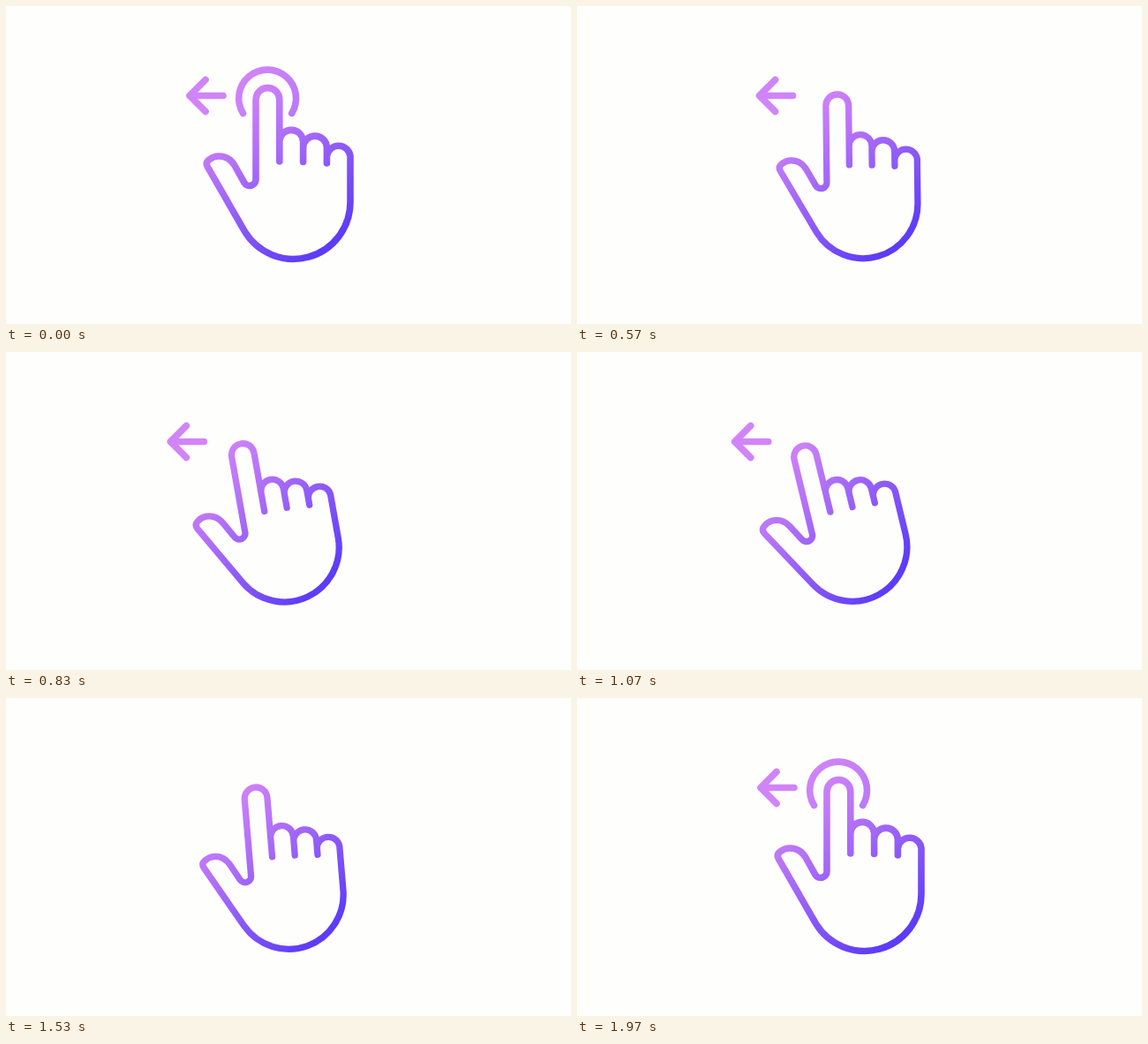
Recreate the animation shown at these times as an HTML page. Size 640 by 360 pixels, loop 2010 ms.

```html
<!DOCTYPE html>
<html lang="en">
<head>
<meta charset="utf-8">
<title>Swipe left gesture</title>
<style>
  html, body { margin: 0; width: 100%; height: 100%; overflow: hidden; background: #fefefd; }
  svg { display: block; width: 100%; height: 100%; }
  g { fill: none; stroke-width: 7.6; stroke-linecap: round; stroke-linejoin: round; }
</style>
</head>
<body>
<svg viewBox="0 0 640 360">
  <defs>
    <linearGradient id="skin" gradientUnits="userSpaceOnUse" x1="245" y1="110" x2="365" y2="270">
      <stop offset="0" stop-color="#d384f8"/>
      <stop offset=".3" stop-color="#b572f8"/>
      <stop offset="1" stop-color="#5c3cf8"/>
    </linearGradient>
    <linearGradient id="glow" gradientUnits="userSpaceOnUse" x1="270" y1="72" x2="326" y2="126">
      <stop offset="0" stop-color="#d384f8"/>
      <stop offset="1" stop-color="#b97af8"/>
    </linearGradient>
  </defs>
  <g id="arrow" stroke="#d184f7"><path/></g>
  <g id="ring" stroke="url(#glow)"><path/></g>
  <g id="hand" stroke="url(#skin)"><path/></g>
</svg>
<script>
  const LOOP = 2010, FPS = 30, FRAMES = 60;
  const TURN = -13.6, SHIFT = -29.3, SHRINK = .04;
  const PIVOT = { x: 303, y: 275.5 };
  const [arrow, ring, hand] = ["arrow", "ring", "hand"].map(id => document.getElementById(id));

  const setPath = (group, d) => group.firstElementChild.setAttribute("d", d);

  // Point on a circle, angle in degrees clockwise from the right.
  function onCircle(x, y, r, deg) {
    const a = deg * Math.PI / 180;
    return `${x + r * Math.cos(a)} ${y + r * Math.sin(a)}`;
  }

  function arrowPath(x, y, head, length) {
    return `M${x + length} ${y}H${x}M${x + head} ${y - head}L${x} ${y}L${x + head} ${y + head}`;
  }

  function ringPath(x, y, r, droop) {
    return `M${onCircle(x, y, r, 180 - droop)}A${r} ${r} 0 1 1 ${onCircle(x, y, r, droop)}`;
  }

  function handPath() {
    const palm = 64.4, cup = 7, tip = 13.4, lean = 149.5;
    const left = 283, right = left + 2 * tip, side = 390;
    // Palm and thumb up to the index finger; both thumb edges share one lean.
    let d = `M${side} 170V222A${palm} ${palm} 0 0 1 ${onCircle(side - palm, 222, palm, lean)}`
      + "L228.6 182.7Q225.5 177.5 230 174Q235 170 241 170Q253 170 259.5 181.5"
      + `L${onCircle(left - cup, 196.5, cup, lean)}A${cup} ${cup} 0 0 0 ${left} 196.5`
      + `V106A${tip} ${tip} 0 0 1 ${right} 106V176`;
    // Folded fingers, each a little lower than the one before.
    for (let i = 0; i < 3; i++) {
      const x = right + 2 * tip * i, y = 153.8 + 5.3 * i + 1.4 * i * i;
      d += `M${x} ${y}A${tip} ${tip} 0 0 1 ${Math.min(x + 2 * tip, side)} ${y}`;
      if (i < 2) d += `V${176.5 + 1.5 * i}`;
    }
    return d;
  }

  // Smooth rise from 0 to 1 between two moments.
  function ease(n, from, to) {
    const s = Math.min(1, Math.max(0, (n - from) / (to - from)));
    return s * s * (3 - 2 * s);
  }

  function draw(now) {
    const n = Math.min(FRAMES - 1, Math.floor((now % LOOP + 4) * FPS / 1000));
    const swipe = ease(n, 15, 30);
    const scale = 1 - SHRINK * (ease(n, 0, 10) - ease(n, 47, 58));
    const angle = TURN * (swipe - ease(n, 37, 52));
    hand.setAttribute("transform", `translate(${PIVOT.x} ${PIVOT.y}) rotate(${angle}) `
      + `scale(${scale}) translate(${-PIVOT.x} ${-PIVOT.y})`);
    // The arrow fades out at the end of its slide and returns at its start.
    const back = n >= 45;
    arrow.setAttribute("transform", `translate(${back ? 0 : SHIFT * swipe} 0)`);
    arrow.setAttribute("opacity", back ? ease(n, 49, 57) : 1 - ease(n, 33, 41));
    ring.setAttribute("opacity", 1 - ease(n, 0, 8) + ease(n, 49, 58));
  }

  setPath(arrow, arrowPath(208, 101.5, 18, 38));
  setPath(ring, ringPath(296.1, 104.5, 32.4, 31.5));
  setPath(hand, handPath());

  const start = performance.now();
  function tick() {
    draw(performance.now() - start);
    requestAnimationFrame(tick);
  }
  tick();
</script>
</body>
</html>
```
